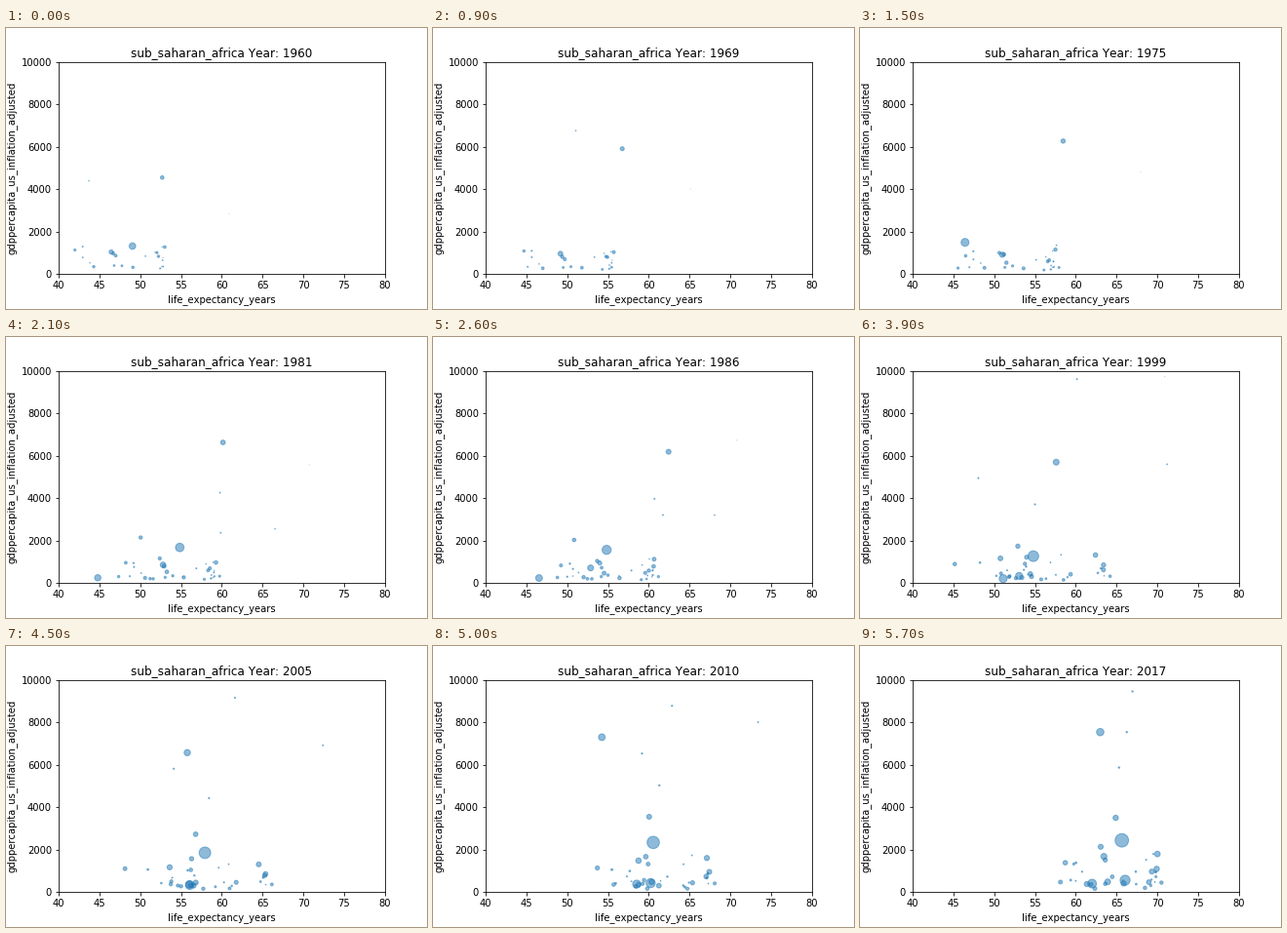
A matplotlib script that plays this animation: 432 by 288 pixels, repeating every 5800 ms.

```python
import numpy as np
import matplotlib.pyplot as plt
from matplotlib.animation import FuncAnimation

FIRST, LAST = 1960, 2017
GROWTH = .0255        # yearly population growth
CROWD, EARLY = 34, 21  # small economies, and how many have data from FIRST

plt.rcParams["text.kerning_factor"] = 6
rng = np.random.default_rng(12)


def keyed(pop, *keys):
    """Bubble moving between (year, life, gdp) keys; pop in millions at LAST."""
    years, life, gdp = zip(*keys)

    def at(year):
        if year < years[0]:
            return None
        return np.interp(year, years, life), np.interp(year, years, gdp), pop
    return at


def drifting(i):
    """Small economy: steady gain in life, a dip around 2001, wandering income."""
    start = FIRST if i < EARLY else 1964 + 2 * (i - EARLY)
    pop = rng.uniform(.7, 6.5) ** 2
    life = rng.uniform(40.5, 53.5)
    dip = rng.uniform(0, 10)
    income = rng.uniform(np.log(230), np.log(1500))
    gain = rng.normal(.15, .45)
    phase = rng.uniform(0, 2 * np.pi)

    def at(year):
        if year < start:
            return None
        age = year - FIRST
        t = age / (LAST - FIRST)
        x = life + .3 * age - dip * np.exp(-((year - 2001) / 9) ** 2)
        slump = .35 * np.sin(np.pi * t)
        wobble = .08 * np.sin(age / 2 + phase)
        return x, np.exp(income + gain * t - slump + wobble), pop
    return at


bubbles = [
    keyed(57, (1960, 52.7, 4540), (1969, 56.75, 5900), (1981, 60.15, 6620),
          (1991, 64.7, 5740), (1999, 57.6, 5690), (2010, 54.25, 7290),
          (2017, 63, 7530)),
    keyed(191, (1960, 49.05, 1310), (1969, 38, 1300), (1981, 54.85, 1670),
          (1999, 54.8, 1260), (2010, 60.55, 2330), (2017, 65.65, 2430)),
    keyed(106, (1981, 44.8, 240), (1999, 51.1, 200), (2017, 66.05, 550)),
    keyed(81, (1960, 46.45, 1030), (1981, 52.8, 850), (1999, 53.05, 330),
          (2017, 62, 390)),
    keyed(30, (1980, 49.9, 2160), (1999, 52.9, 1730), (2010, 60.05, 3540),
          (2017, 64.9, 3490)),
    keyed(2, (1960, 43.7, 4390), (1969, 51.05, 6750), (1974, 54, 11500),
          (2010, 62.85, 8770), (2017, 66.95, 9450)),
    keyed(2.2, (1969, 55.4, 340), (1991, 63.6, 4040), (1999, 48.05, 4940),
          (2017, 66.25, 7530)),
    keyed(2.4, (1980, 59.6, 4310), (1991, 61.6, 3670), (1999, 55, 3700),
          (2017, 65.3, 5860)),
    keyed(1.3, (1976, 65, 1900), (1991, 69.6, 3840), (2010, 73.4, 8000),
          (2017, 74.8, 10250)),
    keyed(.1, (1960, 60.9, 2830), (1981, 70.75, 5570), (1999, 70.9, 9720),
          (2005, 73, 12000)),
]
bubbles += [drifting(i) for i in range(CROWD)]

fig, ax = plt.subplots(figsize=(6, 4), dpi=72)
fig.subplots_adjust(left=.125, right=.9, bottom=.125, top=.88)
ax.set(xlim=(40, 80), ylim=(0, 10000), xlabel="life_expectancy_years",
       ylabel="gdppercapita_us_inflation_adjusted")
dots = ax.scatter([], [], color="C0", alpha=.5)
title = ax.set_title("")


def update(i):
    year = FIRST + i
    states = [s for s in (at(year) for at in bubbles) if s]
    x, y, pop = np.array(states).T
    dots.set_offsets(np.column_stack((x, y)))
    dots.set_sizes(pop * np.exp(GROWTH * (year - LAST)))
    title.set_text(f"sub_saharan_africa Year: {year}")
    return dots, title


anim = FuncAnimation(fig, update, frames=LAST - FIRST + 1, interval=100,
                     repeat=True, repeat_delay=0)
plt.show()
```
